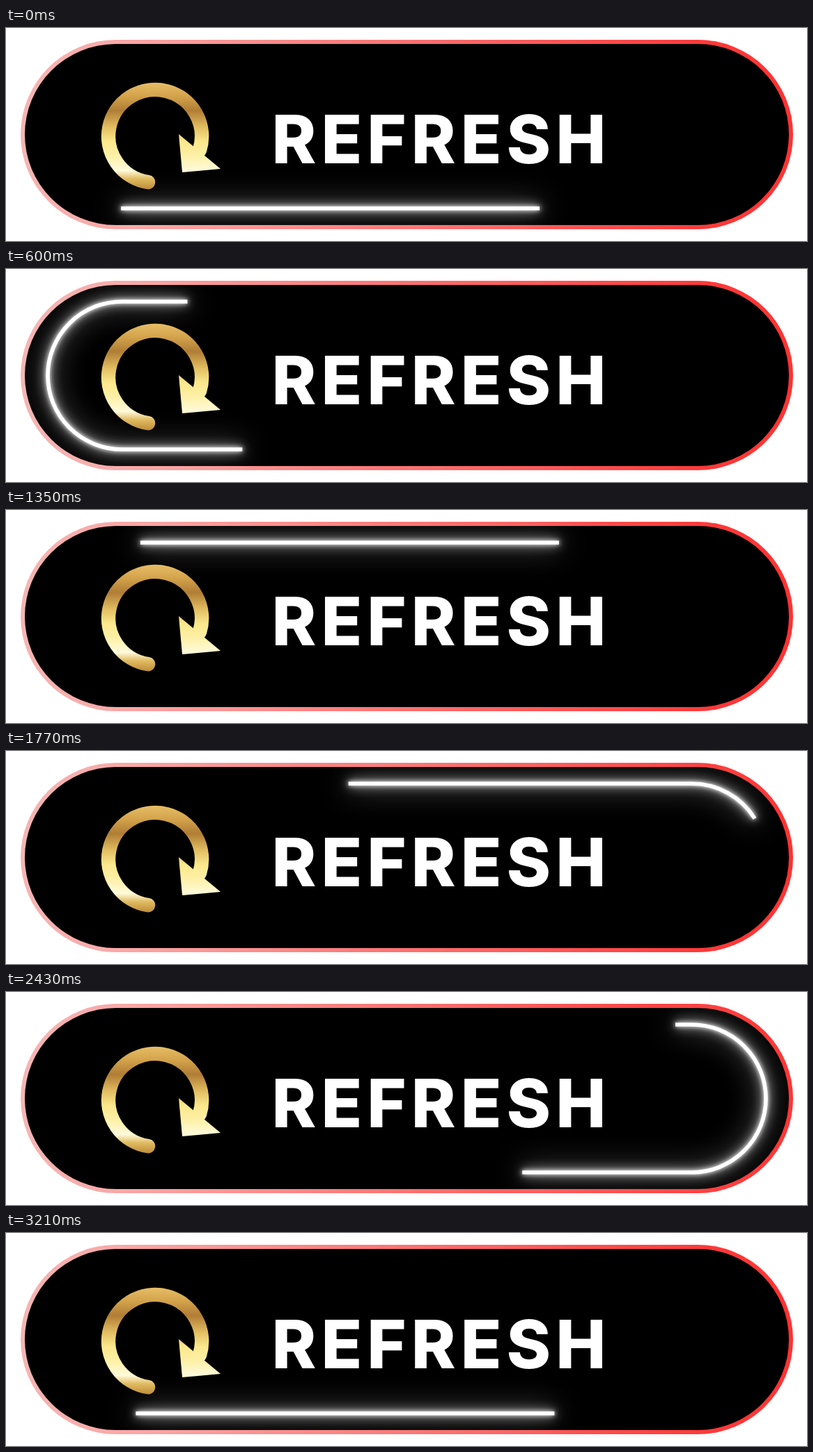
An HTML page for the animation above (3240 ms loop, 1150 by 307 pixels).

```html
<!DOCTYPE html>
<html lang="en">
<head>
<meta charset="utf-8">
<title>Refresh button</title>
<style>
  html, body {
    margin: 0;
    width: 100%;
    height: 100%;
    overflow: hidden;
    background: #fff;
  }
  svg {
    display: block;
    width: 100%;
    height: 100%;
  }
  .beam {
    fill: none;
    stroke: #fff;
    stroke-width: 5.6;
    stroke-dasharray: 601 1704;
    animation: run 3240ms steps(108) infinite;
  }
  @keyframes run {
    from { stroke-dashoffset: 0; }
    to { stroke-dashoffset: -2305; }
  }
  .label {
    font: 800 96.5px Inter, "Open Sans", sans-serif;
    letter-spacing: 7px;
    text-anchor: middle;
    fill: #fff;
  }
</style>
</head>
<body>
<svg viewBox="0 0 1150 307">
  <defs>
    <linearGradient id="rim">
      <stop offset="0" stop-color="#f4b6b4"/>
      <stop offset=".12" stop-color="#f9a9a8"/>
      <stop offset=".88" stop-color="#ff3a3a"/>
      <stop offset="1" stop-color="#ff3232"/>
    </linearGradient>
    <linearGradient id="gold" gradientUnits="userSpaceOnUse" x1="0" y1="79" x2="0" y2="233">
      <stop offset="0" stop-color="#e6bd66"/>
      <stop offset=".12" stop-color="#d4a44c"/>
      <stop offset=".26" stop-color="#b07d35"/>
      <stop offset=".42" stop-color="#e3bf63"/>
      <stop offset=".55" stop-color="#fbe88c"/>
      <stop offset=".68" stop-color="#fdf0a6"/>
      <stop offset=".82" stop-color="#fffadb"/>
      <stop offset=".9" stop-color="#dfba60"/>
      <stop offset="1" stop-color="#bd8b37"/>
    </linearGradient>
    <filter id="glow" filterUnits="userSpaceOnUse" x="0" y="0" width="1150" height="307"
            color-interpolation-filters="sRGB">
      <feGaussianBlur in="SourceGraphic" stdDeviation="20" result="wide"/>
      <feGaussianBlur in="SourceGraphic" stdDeviation="8" result="mid"/>
      <feGaussianBlur in="SourceGraphic" stdDeviation="3" result="near"/>
      <feMerge>
        <feMergeNode in="wide"/>
        <feMergeNode in="mid"/>
        <feMergeNode in="near"/>
        <feMergeNode in="SourceGraphic"/>
      </feMerge>
    </filter>
  </defs>

  <rect x="21" y="17" width="1109" height="273" rx="136.5" fill="url(#rim)"/>
  <rect x="27" y="23" width="1097" height="261" rx="130.5"/>

  <g filter="url(#glow)">
    <path class="beam" pathLength="2305"
          d="M766 260H166.5A106.5 106.5 0 0 1 166.5 47H984.5A106.5 106.5 0 0 1 984.5 260Z"/>
  </g>

  <path d="M204 222.2A67 67 0 1 1 278 176" fill="none" stroke="url(#gold)"
        stroke-width="20.5" stroke-linecap="round"/>
  <path d="M248 153L308 203L253 208Z" fill="url(#gold)"/>

  <text class="label" x="625" y="195">REFRESH</text>
</svg>
</body>
</html>
```
